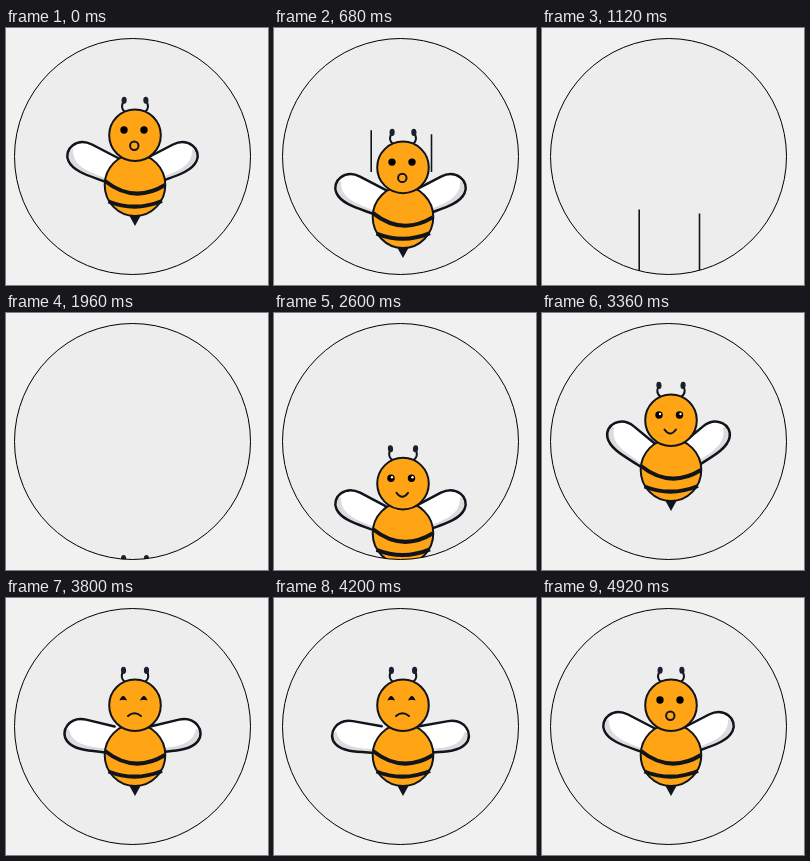
An HTML page that plays this animation: 262x257 px, repeating every 4960 ms.

```html
<!DOCTYPE html>
<html lang="en">
<head>
<meta charset="utf-8">
<title>Bee</title>
<style>
html, body { margin: 0; height: 100%; overflow: hidden; background: #f1f1f1; }
svg { display: block; width: 100%; height: 100%; }
.line { fill: none; stroke: #10141c; stroke-width: 2; stroke-linecap: round; }
.gold { fill: #ffa414; stroke: #10141c; stroke-width: 2; }
</style>
</head>
<body>
<svg viewBox="0 0 262 257">
  <defs>
    <clipPath id="hole"><circle cx="126.5" cy="128.5" r="118"/></clipPath>
    <g id="wing">
      <path d="M112 130L86 116.5C71 109 57 121 62.5 133C68 145 88 149 102 155L116 150Z" fill="#fff"/>
      <path d="M63 123C60 140 80 146 102 155L102 151C84 144 66 139 67 121Z" fill="#dcdcdc"/>
      <path class="line" style="stroke-width:2.5" d="M112 130L86 116.5C71 109 57 121 62.5 133C68 145 88 149 102 155"/>
    </g>
    <g id="feeler">
      <path class="line" d="M117.3 73Q113.5 80 119 84"/>
      <ellipse cx="117.7" cy="72.3" rx="2.6" ry="3.6" fill="#1a2030"/>
    </g>
  </defs>
  <circle cx="126.5" cy="128.5" r="118" fill="#ededed"/>
  <g clip-path="url(#hole)">
    <path id="speed" class="line" style="stroke-width:1.6;stroke-linecap:butt"/>
    <g id="bee">
      <use href="#wing" id="wingL"/>
      <g transform="translate(253 0) scale(-1 1)"><use href="#wing" id="wingR"/></g>
      <path d="M123 187H135L129 198Z" fill="#10141c"/>
      <ellipse class="gold" cx="129" cy="157" rx="30.3" ry="31"/>
      <path class="line" style="stroke-width:4;stroke-linecap:butt"
        d="M99 153Q128 176 159 157M102.5 173.5Q129 184 156 173"/>
      <use href="#feeler" id="feelerL"/>
      <g transform="translate(258 0) scale(-1 1)"><use href="#feeler" id="feelerR"/></g>
      <circle class="gold" cx="129" cy="107.3" r="25.8"/>
      <g class="face">
        <circle cx="118" cy="102" r="3.7"/><circle cx="138" cy="102" r="3.7"/>
        <circle class="line" cx="128.3" cy="117.8" r="4.2"/>
      </g>
      <g class="face">
        <circle cx="117" cy="102" r="3.7"/><circle cx="137.5" cy="102" r="3.7"/>
        <g fill="#fff"><circle cx="118" cy="101" r="1.2"/><circle cx="138.5" cy="101" r="1.2"/></g>
        <path class="line" d="M122.5 116.5Q128 124.500 134 116.500"/>
      </g>
      <g class="face">
        <path d="M113.500 102.500Q117 93.500 121 102.500Q117 101 113.500 102.500ZM134 102.500Q138 93.500 141.500 102.500Q138 101 134 102.500Z"/>
        <path class="line" d="M122 118Q128.500 112.500 135 118"/>
      </g>
    </g>
  </g>
  <circle cx="126.5" cy="128.5" r="118" fill="none" stroke="#000"/>
</svg>
<script>
const LOOP = 4960, BEAT = 2320 / 7, SWAY = 928;
const $ = id => document.getElementById(id);
const faces = document.querySelectorAll('.face');

// Sine ease from 0 to 1 between two times
function ease(t, from, to) {
  const p = Math.min(1, Math.max(0, (t - from) / (to - from)));
  return (1 - Math.cos(Math.PI * p)) / 2;
}
const wave = (t, period) => 2 * Math.PI * (t - 2600) / period;
const drop = t => -22 * ease(t, 0, 480) + 222 * ease(t, 515, 1020) - 200 * ease(t, 1560, 3240);

function draw(now) {
  const t = now % LOOP, y = drop(t);
  $('bee').setAttribute('transform', `translate(0 ${y})`);

  const flying = t > 1500 && t < 4920;
  const beat = flying ? Math.sin(wave(t, BEAT)) : 0;
  const flap = beat * (beat > 0 ? 12.5 : 20);
  const spread = flying ? 0.4 + 0.8 * Math.cos(wave(t, SWAY)) : -0.4;
  for (const side of 'LR') {
    $('wing' + side).setAttribute('transform', `rotate(${flap} 104 143)`);
    $('feeler' + side).setAttribute('transform', `rotate(${-5 * spread} 119 84)`);
  }

  // Trails run down behind the head and lag as it falls
  const top = 102 + 0.18 * (t - 680), end = y + 112;
  $('speed').setAttribute('d', t > 540 && t < 1150
    ? `M97.2 ${top}V${end}M157.5 ${top + 4}V${end}` : '');

  const mood = t < 1500 || t >= 4600 ? 0 : t < 3780 ? 1 : 2;
  faces.forEach((face, i) => face.style.display = i === mood ? '' : 'none');
}

function tick() {
  draw(performance.now());
  requestAnimationFrame(tick);
}
tick();
</script>
</body>
</html>
```
